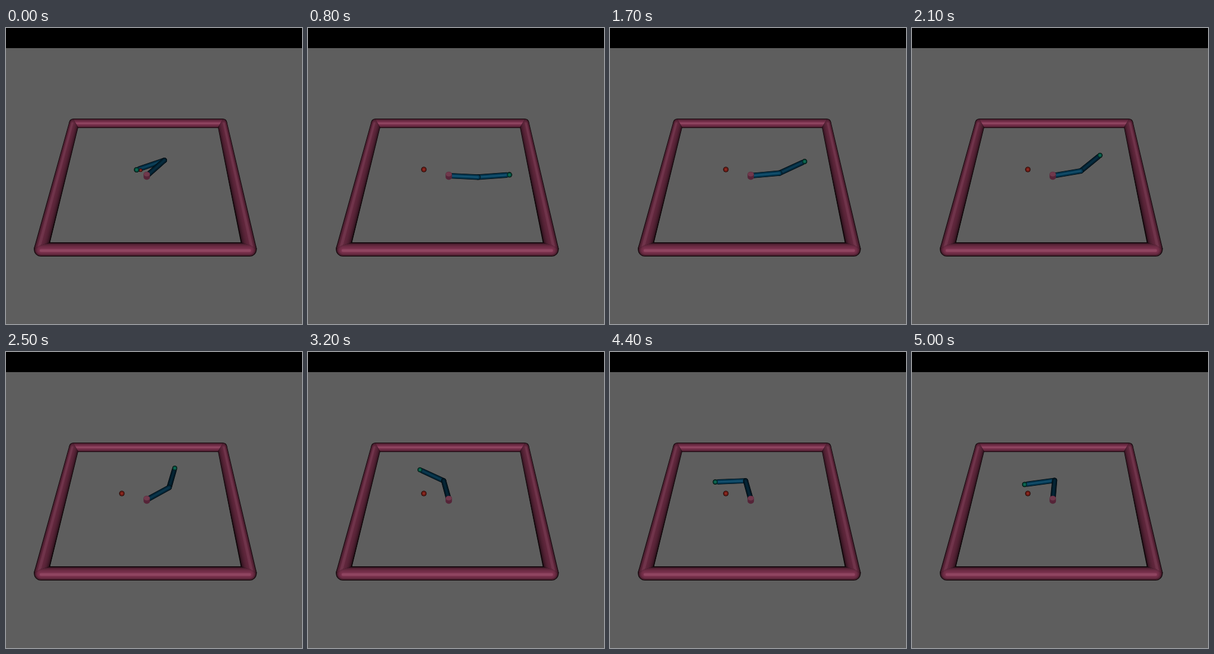
These frames come from a looping animation (500x500 px, 5100 ms). An HTML page with a canvas:

```html
<!DOCTYPE html>
<html>
<head>
<meta charset="utf-8">
<style>
  html, body { margin: 0; height: 100%; overflow: hidden; background: #000; }
  canvas { display: block; width: 500px; height: 500px; }
</style>
</head>
<body>
<canvas id="stage" width="500" height="500"></canvas>
<script>
const ctx = document.getElementById('stage').getContext('2d');
const STEP = 100, STEPS = 51, LAYERS = 10;
const PINK = [124, 50, 78], BLUE = [6, 66, 96], GREEN = [10, 104, 82], RED = [134, 36, 28];

// step, shoulder angle, forearm angle (both absolute, degrees)
const KEYS = [
  [1, -2, -3], [8, -4, 6], [12, 0, 20], [17, 7.3, 32.8], [24, 29, 68], [25, 38.3, 77.3],
  [30, 85, 128], [32, 102, 145.7], [36, 112.5, 166], [39, 112.3, 173.1], [50, 87.4, 191.7]
];

const slope = (a, b, c) => (b[c] - a[c]) / (b[0] - a[0]);

// Slope at a key, weighted by the neighbouring spans
function tangent(i, c) {
  const k = KEYS[i], prev = KEYS[i - 1], next = KEYS[i + 1];
  if (!prev) return 0;
  if (!next) return slope(prev, k, c) / 2;
  const before = k[0] - prev[0], after = next[0] - k[0];
  return (slope(prev, k, c) * after + slope(k, next, c) * before) / (before + after);
}

function angle(step, c) {
  let i = 0;
  while (i < KEYS.length - 2 && KEYS[i + 1][0] <= step) i++;
  const a = KEYS[i], b = KEYS[i + 1], span = b[0] - a[0], t = (step - a[0]) / span;
  const u = 1 - t;
  return u * u * (1 + 2 * t) * a[c] + t * t * (3 - 2 * t) * b[c]
    + span * t * u * (u * tangent(i, c) - t * tangent(i + 1, c));
}

// Table plane to screen, with the scale of a unit length there
function project(u, v) {
  const w = 1 + 0.58 * v;
  return { x: (238 + 490 * u + 146.5 * v) / w, y: (249.5 - 201 * v) / w, scale: 490 / w };
}

function taper(a, ra, b, rb) {
  const dir = Math.atan2(b.y - a.y, b.x - a.x);
  ctx.beginPath();
  ctx.arc(a.x, a.y, ra, dir + Math.PI / 2, dir - Math.PI / 2);
  ctx.arc(b.x, b.y, rb, dir - Math.PI / 2, dir + Math.PI / 2);
  ctx.fill();
}

// Rounded tube shaded from its dark rim to a lit core, which leans toward the light
function tube(a, ra, b, rb, color, { light = 1, leanX = 0, leanY = 0 } = {}) {
  for (let i = 0; i < LAYERS; i++) {
    const s = 1 - i / LAYERS;
    const shade = light * (0.12 + 0.9 * Math.sqrt(1 - s * s));
    const gloss = s < 0.25 ? 18 * light * light : 0;
    const lean = (p, r) => ({ x: p.x + leanX * r * (1 - s), y: p.y + leanY * r * (1 - s) });
    ctx.fillStyle = `rgb(${color.map(n => n * shade + gloss)})`;
    taper(lean(a, ra), ra * s, lean(b, rb), rb * s);
  }
}

function ball(p, r, color) { tube(p, r, p, r, color); }

const back = (dx, y) => ({ x: 240 + dx, y });
const front = (dx, y) => ({ x: 235.3 + dx, y });

// Side rail (-1 left, 1 right), cut along its mitred corners
function drawSide(side) {
  const corners = [
    back(140 * side, 150), back(126 * side, 155), back(118 * side, 168),
    front(160.5 * side, 362), front(178 * side, 367), front(192 * side, 376)
  ];
  ctx.save();
  ctx.beginPath();
  for (const p of corners) ctx.lineTo(p.x, p.y);
  ctx.clip();
  tube(back(124.8 * side, 161), 8.8, front(176.2 * side, 374.5), 12.2, PINK,
    { light: 0.8, leanX: 0.45 * side });
  ctx.restore();
}

function drawArena() {
  ctx.fillStyle = '#000';
  ctx.fillRect(0, 0, 500, 34);
  ctx.fillStyle = '#5e5e5e';
  ctx.fillRect(0, 34, 500, 466);
  tube(back(-125.5, 161), 8, back(125.5, 161), 8, PINK);
  tube(front(-176.2, 374), 12, front(176.2, 374), 12, PINK, { leanY: 0.2 });
  drawSide(-1);
  drawSide(1);
}

function drawArm(shoulder, forearm) {
  const rad = Math.PI / 180;
  const s = shoulder * rad, f = forearm * rad;
  const u = 0.1 * Math.cos(s), v = 0.1 * Math.sin(s);
  const base = project(0, 0), elbow = project(u, v);
  const tip = project(u + 0.11 * Math.cos(f), v + 0.11 * Math.sin(f));
  const radius = p => p.scale * 0.0094;
  const lit = a => ({ light: 0.52 + 0.48 * Math.cos(a) ** 4 });
  ball(tip, radius(tip), GREEN);
  tube(elbow, radius(elbow), project(u + 0.1 * Math.cos(f), v + 0.1 * Math.sin(f)), radius(tip), BLUE, lit(f));
  ball(tip, radius(tip) * 0.9, GREEN);
  tube(base, radius(base), elbow, radius(elbow), BLUE, lit(s));
  drawPivot();
}

// Short upright cylinder
function drawPivot() {
  ctx.fillStyle = '#552438';
  ctx.beginPath();
  ctx.ellipse(237.8, 252, 5.4, 4.4, 0, 0, Math.PI);
  ctx.ellipse(237.8, 247, 5.4, 4.2, 0, Math.PI, 2 * Math.PI);
  ctx.fill();
  ctx.fillStyle = '#70394c';
  ctx.beginPath();
  ctx.ellipse(237.8, 247, 5, 3.8, 0, 0, 2 * Math.PI);
  ctx.fill();
}

function draw(now) {
  const step = Math.floor(now / STEP) % STEPS;
  drawArena();
  if (step === 0) {
    drawArm(51.8, 206.6);
    ball({ x: 227.5, y: 240.3 }, 3, RED);
  } else {
    ball({ x: 195.7, y: 239 }, 4.6, RED);
    drawArm(angle(step, 1), angle(step, 2));
  }
  requestAnimationFrame(draw);
}

requestAnimationFrame(draw);
</script>
</body>
</html>
```
